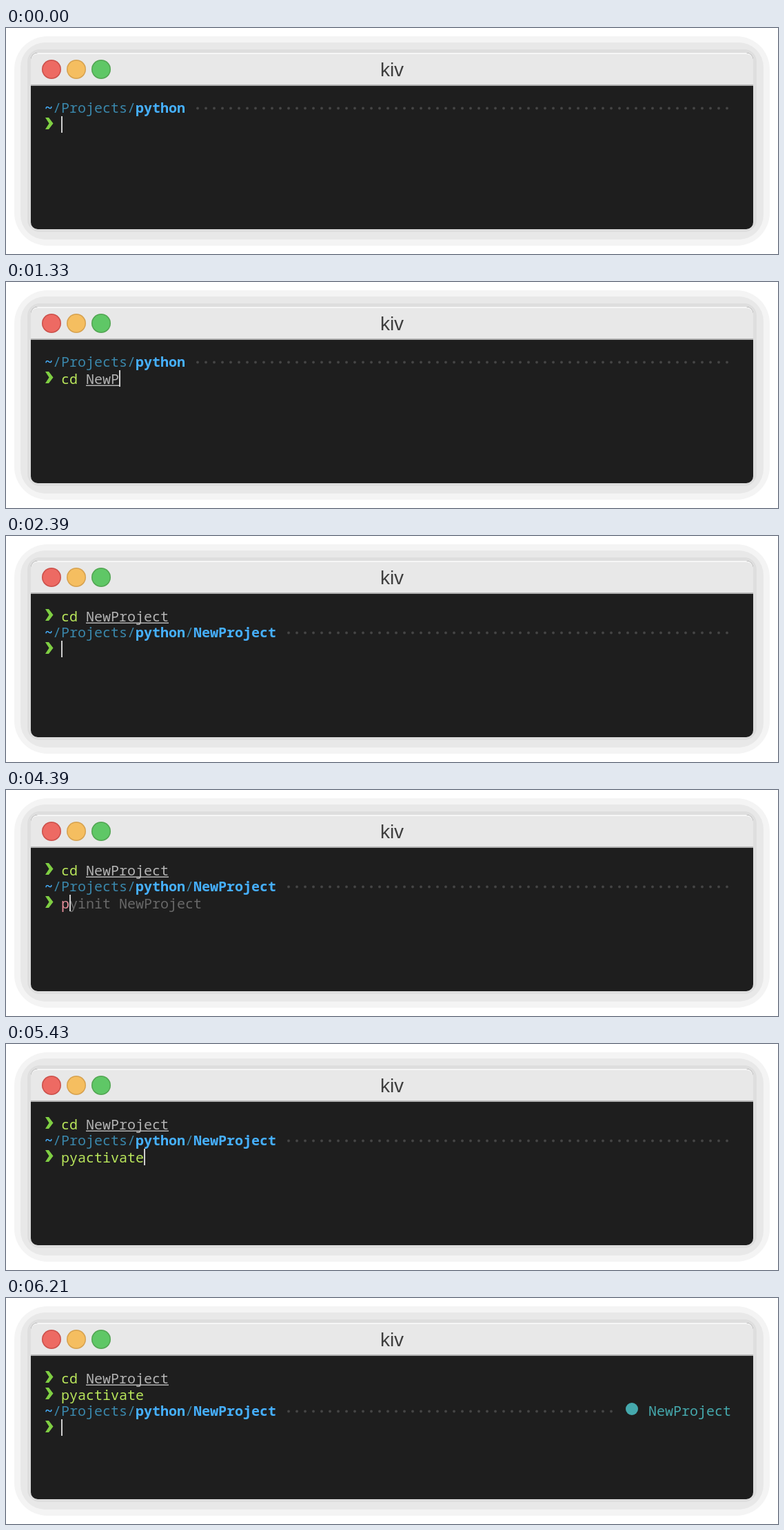
Write an HTML page with a canvas that moves like this. It is 1120 px wide and 328 px high and loops after 8 s.

```html
<!DOCTYPE html>
<html lang="en">
<head>
<meta charset="utf-8">
<style>
  html, body { margin: 0; width: 100%; height: 100%; overflow: hidden; background: #fff; }
  canvas { display: block; }
</style>
</head>
<body>
<canvas width="1120" height="328"></canvas>
<script>
const ctx = document.querySelector('canvas').getContext('2d');
const LOOP = 8000, CELL = 12, LINE = 24, LEFT = 56;
const GREEN = '#b9e65b', PINK = '#e8919c', GREY = '#b4b4b4', GHOST = '#686868';
const BLUE = '#46b0ff', DIM_BLUE = '#3a87ab', TEAL = '#45a9ad';

// Keystroke times, one per typed character; the last one of CD_KEYS is Tab.
const CD_KEYS = [500, 590, 680, 900, 990, 1080, 1330, 1480, 1570, 1740];
const PY_KEYS = [4390, 4470, 4640, 4740, 4930, 5020, 5110, 5290, 5360, 5430];
const CD_ENTER = 2270, CD_DONE = 2390, PY_ENTER = 5990, PY_DONE = 6210;

const columnX = col => LEFT + col * CELL;
const pressed = (keys, t) => keys.filter(k => k <= t).length;

function box(x, y, w, h, radius, color) {
  ctx.fillStyle = color;
  ctx.beginPath();
  ctx.roundRect(x, y, w, h, radius);
  ctx.fill();
}

function disc(x, y, r, color) {
  ctx.fillStyle = color;
  ctx.beginPath();
  ctx.arc(x, y, r, 0, 7);
  ctx.fill();
}

function write(text, col, baseline, color, weight = 400) {
  ctx.font = weight + ' 20px "Noto Sans Mono", monospace';
  ctx.textAlign = 'left';
  ctx.fillStyle = color;
  ctx.fillText(text, columnX(col), baseline);
}

function drawWindow() {
  box(0, 0, 1120, 328, 0, '#fff');
  box(12, 12, 1096, 304, 48, '#f4f4f4');
  box(21, 21, 1078, 286, 36, '#e8e8e8');
  box(31, 31, 1058, 265, 18, '#dedede');
  box(36, 36, 1048, 256, 10, '#1e1e1e');
  box(36, 36, 1048, 46, [10, 10, 0, 0], '#f6f6f6');
  box(36, 38, 1048, 44, [9, 9, 0, 0], '#e8e8e8');
  box(36, 82, 1048, 2, 0, '#b1b1b1');
  [['#cb504a', '#ed6a63'], ['#d6a14f', '#f5be60'], ['#52a552', '#5fc766']].forEach(([rim, fill], i) => {
    disc(66 + i * 36, 60, 14, rim);
    disc(66 + i * 36, 60, 12.5, fill);
  });
  ctx.font = '28px "Liberation Sans", Arial, sans-serif';
  ctx.textAlign = 'center';
  ctx.fillStyle = '#3e3e3e';
  ctx.fillText('kiv', 560, 70);
}

function drawPath(row, folder, dotsEnd) {
  const baseline = 123 + row * LINE;
  write('~', 0, baseline, BLUE, 600);
  write('/Projects/', 1, baseline, DIM_BLUE);
  write('python', 11, baseline, BLUE, 600);
  if (folder) {
    write('/', 17, baseline, DIM_BLUE);
    write(folder, 18, baseline, BLUE, 600);
  }
  for (let x = folder ? 410 : 278; x <= dotsEnd; x += CELL)
    disc(x, 116.5 + row * LINE, 1.9, '#454545');
}

function drawPrompt(row) {
  const y = 106 + row * LINE;
  ctx.fillStyle = '#7fce43';
  ctx.beginPath();
  [[57, 0], [62, 0], [68.5, 8.5], [62, 17], [57, 17], [62.5, 8.5]].forEach(([x, dy]) => ctx.lineTo(x, y + dy));
  ctx.fill();
}

function drawCursor(row, col) {
  box(columnX(col) + (col ? 0 : 1), 104 + row * LINE, 2, 24, 0, '#cfcfcf');
}

function drawCommand(row, command, { arg = '', ghost = '', known = true, underline = false } = {}) {
  const baseline = 124 + row * LINE, argCol = 3 + command.length;
  drawPrompt(row);
  write(command, 2, baseline, known ? GREEN : PINK);
  write(arg, argCol, baseline, GREY);
  if (underline) box(columnX(argCol), baseline + 1.5, arg.length * CELL, 1.5, 0, GREY);
  write(ghost, arg ? argCol + arg.length : 2 + command.length, baseline, GHOST);
}

function drawCdTyping(t) {
  const count = pressed(CD_KEYS, t);
  const tabbed = count === CD_KEYS.length;
  const typed = tabbed ? 'cd NewProject/' : 'cd NewProject'.slice(0, count);
  const ghost = count > 0 && count < 5 ? 'cd Notes'.slice(count) : '';
  const [command, arg = ''] = typed.split(' ');
  drawPath(0, '', 1047);
  drawCommand(1, command, {
    arg, known: count > 1, underline: arg && !tabbed,
    ghost: count === 3 ? ' ' + ghost : ghost
  });
  drawCursor(1, 2 + typed.length);
}

function drawPyTyping(t) {
  const count = pressed(PY_KEYS, t);
  const guess = count < 3 ? 'pyinit NewProject' : 'pyactivate';
  drawPath(1, 'NewProject', 1047);
  drawCommand(2, 'pyactivate'.slice(0, count), {
    ghost: count ? guess.slice(count) : '', known: count === PY_KEYS.length
  });
  drawCursor(2, 2 + count);
}

function drawActivated() {
  drawPath(2, 'NewProject', 879);
  disc(908, 161, 9, TEAL);
  write('NewProject', 73, 171, TEAL);
  drawPrompt(3);
  drawCursor(3, 2);
}

function draw(t) {
  drawWindow();
  if (t < CD_ENTER) return drawCdTyping(t);
  drawCommand(0, 'cd', { arg: 'NewProject', underline: true });
  if (t < CD_DONE) return drawCursor(1, 0);
  if (t < PY_ENTER) return drawPyTyping(t);
  drawCommand(1, 'pyactivate');
  if (t < PY_DONE) return drawCursor(2, 0);
  drawActivated();
}

function tick() {
  draw(performance.now() % LOOP);
  requestAnimationFrame(tick);
}
tick();
</script>
</body>
</html>
```
